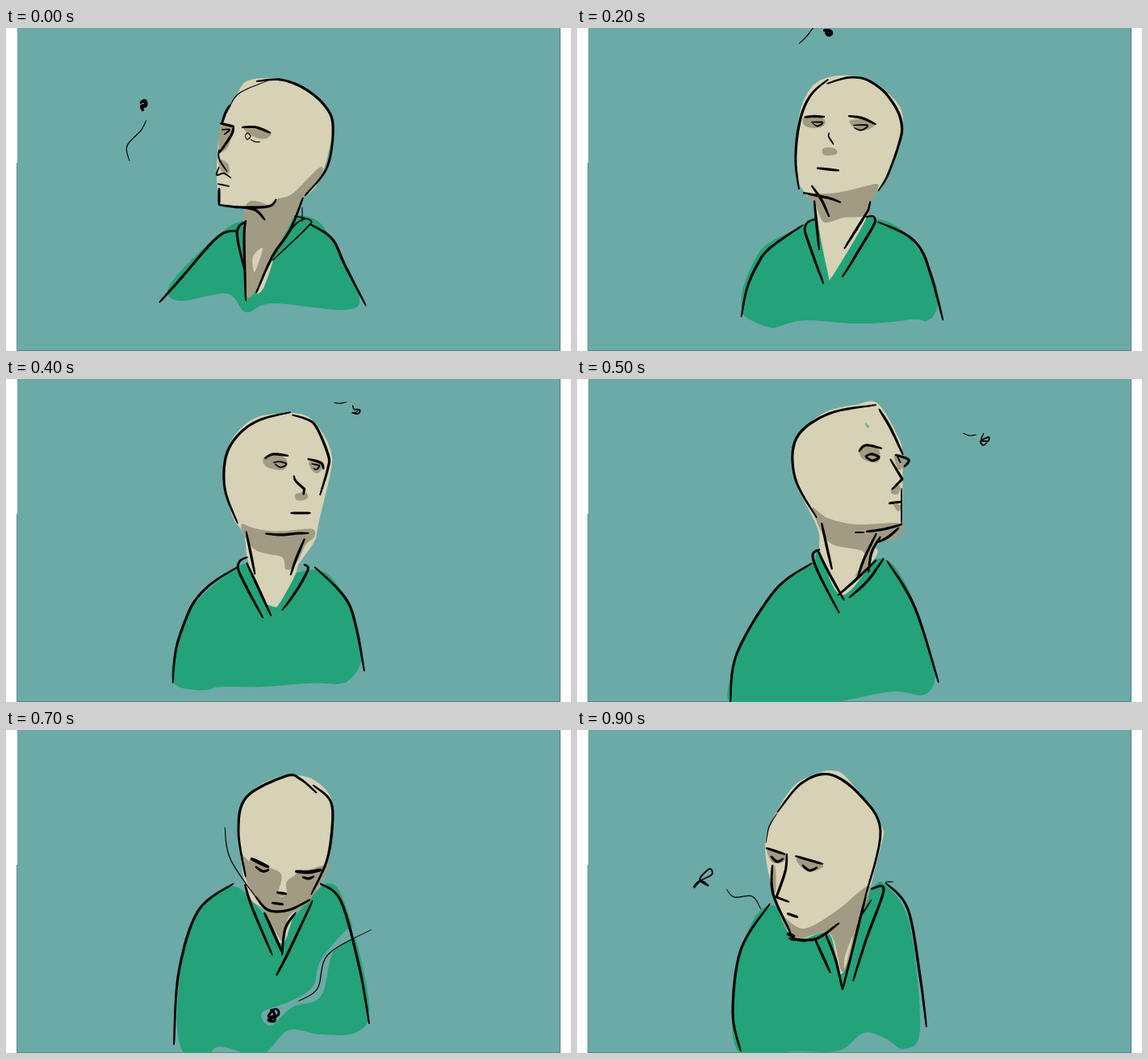
Recreate the animation shown at these times as an HTML page. Size 700x400 px, loop 1 s.

```html
<!DOCTYPE html>
<html lang="en">
<head>
<meta charset="utf-8">
<title>Man watching a fly</title>
<style>
html, body { margin: 0; width: 100%; height: 100%; overflow: hidden; background: #fff; }
svg { display: block; width: 700px; height: 400px; overflow: hidden; }
#strip { animation: flip 1s steps(10) infinite; }
.c { fill: #24a279; }
.s { fill: #d7d1b5; }
.d { fill: #a19b83; }
.b { fill: #6caaa7; }
@keyframes flip { to { transform: translateX(-7000px); } }
</style>
</head>
<body>
<svg viewBox="0 0 700 400">
<rect x="14" width="673" height="400" fill="#6caaa7"/>
<path d="M13.5 167V400M686.5 0V400M14 399.7H687" fill="none" stroke="#4b7775" stroke-width=".8"/>
<!-- c coat, s skin, d shade, b backdrop; f fine, t thin, h heavy ink -->
<g id="strip">
<g>
<path class="c" d="M203 318 260 259 297 238 372 233 404 262 437 330 420 349 330 341 297 352 274 329 215 338"/>
<path class="s" d="M300 65 335 63 365 72 395 95 405 120 392 180 372 207 328 221 265 219 265 219 261 183 266 122 285 84"/>
<path class="d" d="M388 173 355 205 335 212 330 220 296 222 297 328 314 318 335 275 372 207 391 182"/>
<path class="s" d="M318 273 306 283 308 302"/>
<path class="s" d="M331 286 319 322 311 326"/>
<path class="d" d="M295 124 327 129 322 137 308 135"/>
<path class="d" d="M266 122 281 124 274 149 264 150"/>
<path class="d" d="M264 163 275 168 276 180 266 176"/>
<path d="M267 120 272 105 278 95"/>
<path class="t" d="M277 97 290 80 325 65"/>
<path d="M310 66 340 64 368 74 393 94 405 120 398 172 370 208"/>
<path d="M265 118 283 122"/>
<path d="M292 123 310 123 328 130"/>
<path d="M282 122 279 133 264 155"/>
<path class="f" d="M264 150 264 162 274 178"/>
<path class="f" d="M264 172 261 182 270 180 279 186"/>
<path class="f" d="M262 193 277 196"/>
<path d="M264 198 264 220"/>
<path d="M264 219 290 222 325 221 335 212"/>
<path d="M293 222 310 226 321 238"/>
<path class="t" d="M296 134 299 130 303 134 299 138 296 134"/>
<path class="t" d="M303 138 309 141 315 141"/>
<path class="f" d="M267 126 277 126 270 132"/>
<path d="M368 210 352 250 330 283 310 328"/>
<path class="f" d="M327 287 357 245 372 236"/>
<path class="f" d="M357 233 377 238 372 248 330 288"/>
<path class="t" d="M367 222 367 240"/>
<path d="M297 238 295 260 297 338"/>
<path d="M298 239 288 247 287 262 296 302"/>
<path d="M286 251 262 259 215 312 190 340"/>
<path d="M377 243 404 261 420 294 446 344"/>
<path class="h" d="M166 93 172 90 173 96 168 97 170 103"/>
<path class="t" d="M174 114 167 127 150 146 153 165"/>
</g>
<g>
<path class="c" d="M188 358 187 322 220 277 262 257 300 241 368 239 400 247 430 287 450 345 430 376 410 362 335 367 268 363 235 378 200 362"/>
<path class="s" d="M290 76 315 68 345 69 395 100 399 130 385 192 360 222 357 240 305 308 300 305 297 222 275 214 270 170 275 110"/>
<path class="d" d="M280 215 320 211 372 196 381 196 358 221 355 241 325 243 298 258 297 226"/>
<path class="d" d="M273 114 290 113 293 122 276 126"/>
<path class="d" d="M320 116 357 124 348 132 324 126"/>
<path class="d" d="M282 148 294 148 296 156 282 157"/>
<path d="M273 214 270 160 274 120 279 95 288 77"/>
<path d="M284 86 313 69 345 69 375 80 398 115 387 184 372 210"/>
<path d="M276 214 290 217 306 230"/>
<path d="M271 114 292 116"/>
<path d="M319 114 340 116 359 124"/>
<path class="f" d="M275 122 288 121 281 125 275 122"/>
<path class="f" d="M324 127 342 126 336 131 325 130"/>
<path class="f" d="M300 119 296 129 289 139"/>
<path d="M275 169 297 173"/>
<path d="M296 228 297 260 299 302"/>
<path d="M294 243 283 250 288 280 299 332"/>
<path d="M358 225 355 241 355 241 305 306"/>
<path d="M357 231 367 236 335 280 310 315"/>
<path d="M283 147 293 148 299 155"/>
<path d="M278 250 225 291 196 324 184 363"/>
<path d="M365 240 412 262 440 315 467 376"/>
<path class="h" d="M255 8 260 5 265 6 262 9 256 8"/>
<path class="t" d="M245 12 238 11 228 30 215 47"/>
</g>
<g>
<path class="c" d="M223 352 231 290 240 266 283 238 298 226 362 232 405 252 437 292 447 340 425 357 380 366 272 360 255 368"/>
<path class="s" d="M295 66 315 53 340 51 370 56 403 92 406 125 372 196 358 240 326 312 326 312 300 248 291 198 277 186 271 150 278 95"/>
<path class="d" d="M291 199 330 197 368 193 362 222 325 226 299 217"/>
<path class="d" d="M289 108 305 105 321 111 315 122 290 118"/>
<path class="d" d="M357 113 370 107 380 112 368 124"/>
<path class="d" d="M328 150 345 150 347 156 330 158"/>
<path d="M277 186 271 145 282 90 302 63 335 50"/>
<path d="M335 52 365 54 385 66 406 120 401 145 374 194"/>
<path d="M284 194 307 199 330 199 348 202"/>
<path d="M292 107 305 104 322 104"/>
<path d="M353 104 367 107 382 115"/>
<path class="f" d="M305 111 321 113 315 118 309 114"/>
<path class="f" d="M360 114 378 115 369 122 361 117"/>
<path d="M325 140 326 146 347 150"/>
<path d="M319 178 353 180"/>
<path d="M292 199 297 225 301 248"/>
<path d="M298 230 281 239 290 262 312 302"/>
<path d="M369 204 357 241"/>
<path d="M358 237 377 236 358 282 347 302"/>
<path d="M298 243 310 270 326 313"/>
<path d="M282 238 240 265 230 293 223 353"/>
<path d="M380 240 425 265 437 297 440 348"/>
<path class="f" d="M355 -2 365 2 366 7 361 9 358 4 364 0"/>
<path class="t" d="M350 -12 335 -8"/>
<path class="d" d="M329 181 341 181 339 187 331 187"/>
<path d="M358 238 353 265 337 299"/>
<path class="t" d="M273 165 272 180 275 197"/>
<path class="f" d="M365 203 380 197"/>
<path class="h" d="M325 200 347 201"/>
<path class="h" d="M312 114 319 114"/>
</g>
<g>
<path class="c" d="M192 402 191 365 200 335 245 263 292 228 298 211 330 250 376 222 408 255 435 330 444 368 430 391 390 387 320 400 260 402"/>
<path class="s" d="M285 58 310 40 345 32 372 30 397 70 403 95 403 180 403 180 372 205 370 220 328 268 302 215 298 185 268 120 270 80"/>
<path class="d" d="M292 160 310 172 345 180 402 179 396 197 372 204 355 243 345 244 356 215 312 202"/>
<path class="d" d="M350 86 365 81 375 90 372 103 354 99"/>
<path class="d" d="M393 94 405 95 404 108 398 112"/>
<path class="d" d="M390 135 400 132 398 142 390 142"/>
<path d="M297 172 270 122 272 73 312 43 371 32"/>
<path d="M374 37 388 60 404 94"/>
<path d="M358 189 380 186 403 180"/>
<path d="M349 90 358 82 378 86"/>
<path d="M394 94 411 100 405 109"/>
<path d="M357 96 365 93 374 97 366 101 357 96"/>
<path class="f" d="M397 96 401 104"/>
<path d="M388 99 403 124 403 124 390 137"/>
<path d="M386 154 402 152"/>
<path d="M303 178 310 210 316 236"/>
<path d="M301 211 292 218 300 242 325 290"/>
<path d="M371 191 356 222 348 245"/>
<path d="M380 222 360 250 337 271"/>
<path d="M298 212 312 240 331 274"/>
<path d="M291 228 245 262 198 340 190 400"/>
<path d="M384 225 408 262 425 300 448 376"/>
<path class="f" d="M504 67 501 75 510 72 509 77 500 77 503 82 508 79"/>
<path class="t" d="M495 69 486 70 478 67"/>
<path class="d" d="M392 155 402 157 398 164"/>
<path class="b" d="M357 54 362 59 359 60"/>
<path class="f" d="M402 135 402 180"/>
<path class="f" d="M344 190 356 190"/>
<path d="M399 184 385 196 370 203"/>
<path d="M376 195 365 215 361 240"/>
<path d="M371 224 345 249 323 268"/>
</g>
<g>
<path class="c" d="M220 400 212 345 228 245 280 193 340 240 398 190 425 230 450 340 435 374 390 377 350 372 316 402 265 392 250 402"/>
<path class="b" d="M317 350 352 336 380 318 390 285 425 245 432 256 405 275 390 330 355 343 328 366"/>
<path class="s" d="M298 85 315 68 345 57 378 60 403 85 402 125 390 190 360 222 342 265 322 225 300 205 290 150 290 110"/>
<path class="d" d="M292 155 305 165 340 177 337 204 348 204 350 185 392 168 399 172 375 212 350 232 343 262 322 228 297 185"/>
<path class="d" d="M303 160 326 170 320 178 305 168"/>
<path class="d" d="M360 177 391 173 383 185 365 185"/>
<path class="d" d="M334 200 349 202 347 206 335 205"/>
<path d="M297 182 288 125 298 83 347 57 365 61 385 78"/>
<path d="M380 68 402 88 404 122 397 163 378 204"/>
<path d="M309 206 325 223 350 223 377 210"/>
<path class="h" d="M303 159 326 170"/>
<path class="h" d="M358 175 375 176 391 173"/>
<path d="M309 169 318 175 326 173"/>
<path d="M367 182 375 184 382 181"/>
<path d="M335 201 348 203"/>
<path d="M329 214 344 216"/>
<path d="M320 226 332 252 342 275"/>
<path d="M296 191 305 220 330 279"/>
<path d="M359 226 346 246 342 279"/>
<path d="M380 211 350 275 335 304"/>
<path d="M320 226 342 275"/>
<path d="M282 190 238 224 214 300 208 390"/>
<path d="M389 190 415 212 438 295 450 364"/>
<path d="M327 347 336 346 337 353 325 359 333 360 331 348 325 355 337 353"/>
<path class="t" d="M362 336 386 320 399 278 453 247"/>
<path class="t" d="M271 120 279 162 320 221"/>
</g>
<g>
<path class="c" d="M205 365 205 280 230 210 258 194 378 196 415 235 440 360 405 383 320 366 285 377 252 366 235 385"/>
<path class="b" d="M230 245 250 222 268 255 258 310 290 340 320 342 318 350 280 357 248 325 252 265"/>
<path class="s" d="M290 82 310 78 345 86 385 112 390 145 365 235 335 288 285 266 258 180 258 140 268 100"/>
<path class="d" d="M357 235 355 250 335 288 290 270 272 245 310 253"/>
<path class="d" d="M283 202 296 205 288 225 290 235 278 232"/>
<path class="d" d="M265 177 295 185 292 193 268 186"/>
<path class="d" d="M313 183 343 188 340 199 316 191"/>
<path d="M267 106 273 97 288 91"/>
<path d="M276 96 282 86 305 82 362 98 388 140 374 200"/>
<path class="t" d="M268 107 262 128"/>
<path d="M262 128 258 175 270 230 285 262"/>
<path d="M285 262 305 270 350 248 358 238"/>
<path d="M375 197 361 225"/>
<path d="M267 177 285 180"/>
<path d="M270 183 277 187 284 186"/>
<path d="M288 179 295 186 298 199"/>
<path d="M315 183 342 187"/>
<path d="M320 192 327 196 336 195"/>
<path class="f" d="M294 203 287 220 285 232"/>
<path d="M285 232 298 237"/>
<path d="M289 245 310 249"/>
<path class="h" d="M299 272 308 273"/>
<path d="M303 271 318 289 340 300"/>
<path d="M313 271 333 291 333 291 352 252"/>
<path d="M376 198 368 225 355 258"/>
<path d="M386 200 372 235 341 297"/>
<path d="M258 193 222 215 206 280 202 373"/>
<path d="M375 198 410 223 428 290 441 367"/>
<path class="f" d="M235 237 245 240 251 236 247 232 236 246 240 250 247 236"/>
<path class="t" d="M266 255 265 275 252 308 278 345 319 343"/>
</g>
<g>
<path class="c" d="M202 400 193 340 203 270 238 217 300 250 364 196 382 192 412 240 425 370 405 395 382 382 355 375 325 397 270 398"/>
<path class="s" d="M270 68 295 55 315 50 335 60 375 115 375 150 330 300 312 252 268 258 243 200 233 140 248 100"/>
<path class="d" d="M363 193 345 250 329 300 313 252 270 258 252 228 280 246 320 225"/>
<path class="s" d="M342 255 332 294 332 280"/>
<path class="d" d="M236 147 258 153 256 163 242 164"/>
<path class="d" d="M272 159 304 167 296 174 282 173"/>
<path class="d" d="M241 168 246 172 246 200 241 194"/>
<path d="M248 102 278 66 313 55 350 80 376 125 357 207"/>
<path class="t" d="M248 103 238 120 234 140"/>
<path d="M234 146 258 154"/>
<path d="M270 156 305 166"/>
<path d="M240 156 248 163 256 159"/>
<path d="M279 167 288 174 298 170"/>
<path d="M260 153 258 175 247 207 247 207 263 213"/>
<path d="M242 167 243 203 265 252"/>
<path d="M260 227 274 232"/>
<path class="h" d="M260 252 270 256"/>
<path d="M262 258 295 259 325 239"/>
<path class="t" d="M264 260 284 262"/>
<path d="M294 257 314 301"/>
<path d="M308 253 320 283 329 322"/>
<path d="M329 322 348 245 358 205"/>
<path d="M364 197 380 198 358 260 342 311"/>
<path class="f" d="M352 230 365 210"/>
<path d="M239 215 203 272 193 350 203 398"/>
<path d="M382 189 410 222 425 305 433 368"/>
<path class="t" d="M382 188 392 188"/>
<path class="f" d="M144 195 150 188 167 179 164 172 152 185 163 193 154 187 145 196"/>
<path class="t" d="M185 197 195 207 217 206 228 222"/>
</g>
</g>
</svg>
<script>
const widths = { h: 4.6, f: 2, t: 1.3 };
const strip = document.getElementById('strip');
const mix = (p, q, t) => p.map((v, k) => v + (q[k] - v) * t);
const gap = (p, q) => Math.hypot(q[0] - p[0], q[1] - p[1]);

// Samples a Catmull-Rom curve; a repeated point makes a corner.
function curve(pts, closed) {
  const n = pts.length, out = [];
  const at = i => closed ? pts[(i + n) % n] : pts[Math.max(0, Math.min(n - 1, i))];
  for (let i = 0; i < (closed ? n : n - 1); i++) {
    const [a, b, c, d] = [at(i - 1), at(i), at(i + 1), at(i + 2)];
    if (!gap(b, c)) continue;
    for (let t = 0; t < 1; t += .125) {
      out.push([0, 1].map(k => b[k] + .5 * t * (c[k] - a[k] +
        t * (2 * a[k] - 5 * b[k] + 4 * c[k] - d[k] + t * (3 * (b[k] - c[k]) + d[k] - a[k])))));
    }
  }
  out.push(closed ? pts[0] : pts[n - 1]);
  return out;
}

// Spreads points evenly along a line.
function even(line, count = 60) {
  const far = [0];
  line.slice(1).forEach((p, i) => far.push(far[i] + gap(line[i], p)));
  const total = far[far.length - 1];
  return Array.from({ length: count + 1 }, (_, i) => {
    const d = total * i / count;
    const j = Math.max(1, far.findIndex(f => f >= d - 1e-6));
    return mix(line[j - 1], line[j], (d - far[j - 1]) / (far[j] - far[j - 1] || 1));
  });
}

// Outlines a brush line that thins towards both ends.
function brush(line, width) {
  const last = line.length - 1, left = [], right = [];
  line.forEach(([x, y], i) => {
    const p = line[Math.max(0, i - 1)], q = line[Math.min(last, i + 1)];
    const r = width / 2 * (.5 + .5 * Math.sqrt(Math.abs(Math.sin(Math.PI * i / last)))) / (gap(p, q) || 1);
    const dx = (q[0] - p[0]) * r, dy = (q[1] - p[1]) * r;
    left.push([x - dy, y + dx]);
    right.unshift([x + dy, y - dx]);
  });
  return left.concat(right);
}

function read(path) {
  const kind = path.getAttribute('class') || '';
  const pts = path.getAttribute('d').slice(1).match(/-?\d+ -?\d+/g).map(s => s.split(' ').map(Number));
  const fill = /[csdb]/.test(kind);
  return { kind, fill, line: curve(pts, fill) };
}

// Halfway pose; the fly and its trail come last and may swing aside.
function between(a, b, swing) {
  const [from, to] = [a, b].map(pose => pose.filter(s => s.kind !== 'b').slice(0, 24));
  return from.map((s, i) => {
    const goal = even(to[i].line), dx = i > 21 ? swing : 0;
    return { ...s, line: even(s.line).map((p, k) => mix(p, goal[k], .5)).map(([x, y]) => [x + dx, y]) };
  });
}

function draw({ kind, fill, line }) {
  const edge = fill ? line : brush(line, widths[kind] || 3.3);
  const d = edge.map(p => p.map(v => v.toFixed(1)).join(' ')).join('L');
  return `<path class="${kind}" d="M${d}Z"/>`;
}

const [calm, up, front, side, down, left, turn] = [...strip.children].map(g => [...g.children].map(read));
const poses = [calm, up, between(up, front, 0), front, between(front, side, 0), side,
  between(side, down, 45), down, left, turn];
strip.innerHTML = poses.map((pose, i) =>
  `<g transform="translate(${i * 700})">${pose.map(draw).join('')}</g>`).join('');
</script>
</body>
</html>
```
